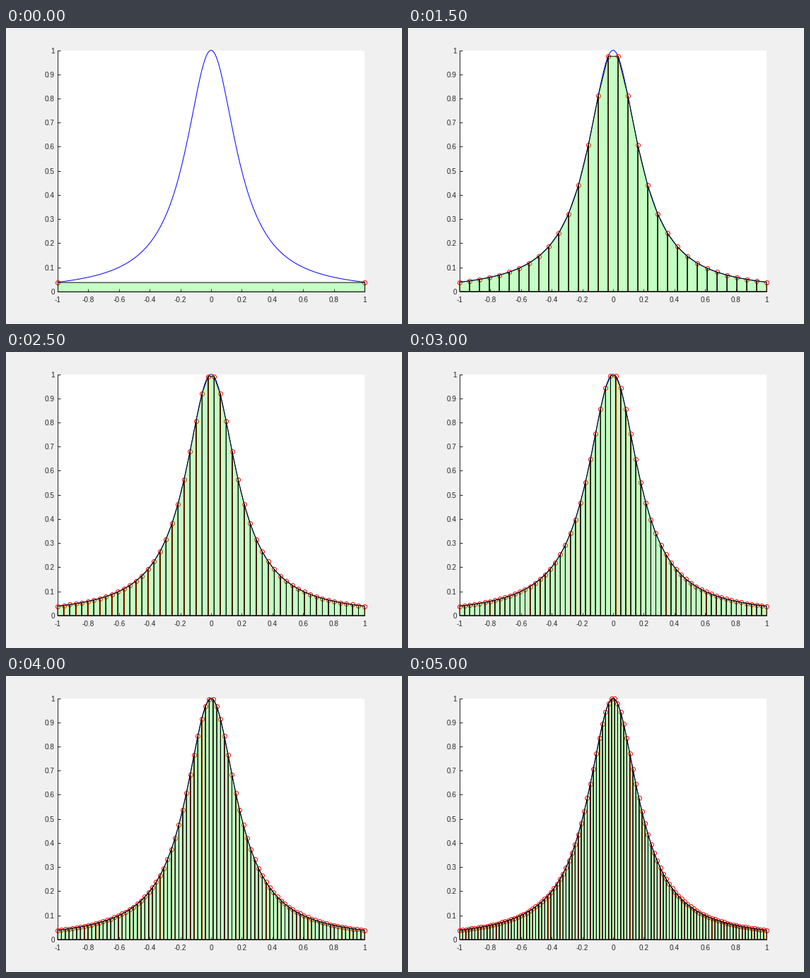
A matplotlib script that plays this animation: 560 by 420 pixels, repeating every 5500 ms.

```python
import numpy as np
import matplotlib.pyplot as plt
from matplotlib.animation import FuncAnimation
from matplotlib.collections import LineCollection, PolyCollection

W, H, DPI = 560, 420, 100
PX = 72 / DPI  # one pixel in points
LEFT, RIGHT, TOP, BOTTOM = 73, 507, 31.5, 373.8
INK = "#262626"

plt.rcParams["font.family"] = "Liberation Sans"


def runge(x):
    return 1 / (1 + 25 * x**2)


fig = plt.figure(figsize=(W / DPI, H / DPI), dpi=DPI, facecolor="#f0f0f0")
ax = fig.add_axes([LEFT / W, 1 - BOTTOM / H, (RIGHT - LEFT) / W, (BOTTOM - TOP) / H])
ax.set(xlim=(-1, 1), ylim=(0, 1))
ax.set_axisbelow(True)

for side, spine in ax.spines.items():
    spine.set(linewidth=PX, color=INK, zorder=0.6)
    spine.set_visible(side in ("left", "bottom"))


def set_ticks(axis, values, pad):
    axis.set_ticks(values, [f"{v:g}" for v in values])
    axis.set_tick_params(direction="in", length=4 * PX, width=PX, color=INK,
                         labelcolor=INK, labelsize=10 * PX, pad=pad * PX)


set_ticks(ax.xaxis, np.arange(-5, 6) / 5, 7)
set_ticks(ax.yaxis, np.arange(11) / 10, 4.2)

grid = np.linspace(-1, 1, 201)
ax.plot(grid, runge(grid), color="blue", lw=PX, zorder=3, clip_on=False)

stems = LineCollection([], colors="red", linewidths=PX, zorder=4, clip_on=False)
stems.set_snap(True)
ax.add_collection(stems, autolim=False)

dots, = ax.plot([], [], "o", ms=6 * PX, mfc="none", mec="red", mew=PX,
                zorder=5, clip_on=False)

panels = PolyCollection([], facecolors=[(0, 1, 0, 0.23)], edgecolors="black",
                        linewidths=PX, zorder=6, clip_on=False)
panels.set_snap(False)
ax.add_collection(panels, autolim=False)


def draw(i):
    """Trapezoid rule with 1, 11, 21, ... 101 panels."""
    x = np.linspace(-1, 1, 10 * i + 2)
    y = runge(x)
    stems.set_segments([[(a, 0), (a, b)] for a, b in zip(x, y)])
    dots.set_data(x, y)
    panels.set_verts([[(a, 0), (a, fa), (b, fb), (b, 0)]
                      for a, b, fa, fb in zip(x, x[1:], y, y[1:])])
    return stems, dots, panels


anim = FuncAnimation(fig, draw, frames=11, interval=500, repeat=True, repeat_delay=0)
plt.show()
```
